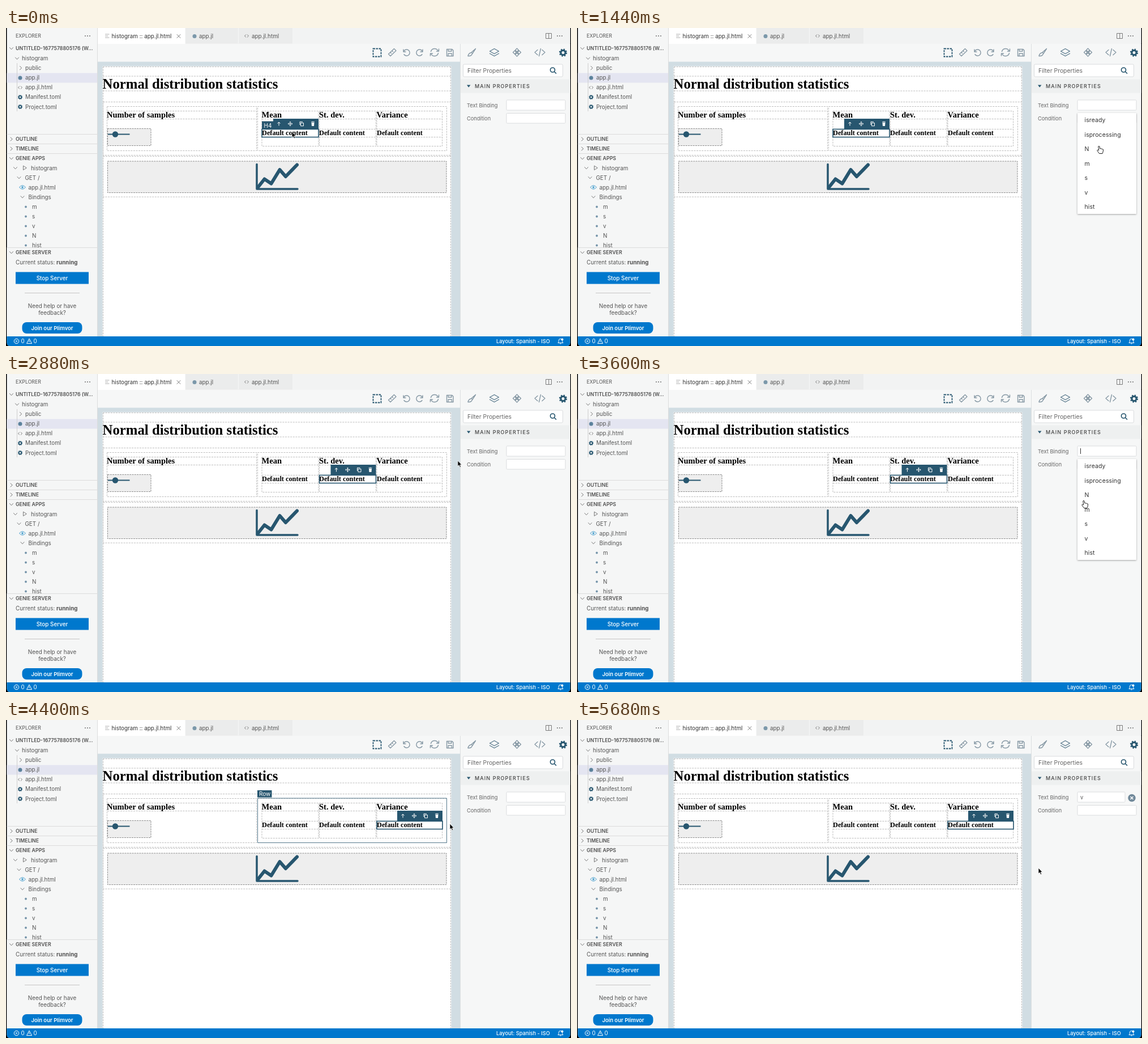
Write an HTML page that moves like this. It is 998 px wide and 561 px high and loops after 5760 ms.

```html
<!DOCTYPE html>
<html lang="en">
<head>
<meta charset="utf-8">
<title>Binding editor</title>
<style>
html, body { margin: 0; width: 100%; height: 100%; overflow: hidden; background: #000; }
svg { display: block; width: 998px; height: 561px; }
text { font: 9.9px Inter, sans-serif; fill: #555; white-space: pre; }
.head text, text.head { font-size: 8.8px; font-weight: 600; fill: #505050; }
.mid { text-anchor: middle; }
.page text { font: bold 14.55px "Liberation Serif", serif; fill: #000; }
.page .h1 { font-size: 24.8px; }
.page .h4 { font-size: 12.3px; }
.menu text { font-size: 10.5px; letter-spacing: .1px; fill: #333; }
.label text { font-size: 10px; fill: #fff; }
.label rect { fill: #27566f; }
.field { fill: #fff; stroke: #dadcde; }
.line { fill: none; stroke: #7a7a7a; stroke-linecap: round; stroke-linejoin: round; }
.tool { fill: none; stroke: #8799a5; stroke-width: 1.4; stroke-linecap: round; stroke-linejoin: round; }
.dash { fill: none; stroke: #bdbdbd; stroke-dasharray: 3 1.6; }
.block { fill: #eee; stroke: #8e8e8e; stroke-dasharray: 3 1.3; }
.pick { fill: none; stroke: #27566f; stroke-width: 1.6; }
.thin { fill: none; stroke: #55788c; }

.show { opacity: 0; animation: 5760ms step-end infinite; }
#sel1 { animation-name: sel1; }
#sel2 { animation-name: sel2; }
#sel3 { animation-name: sel3; }
#hov1 { animation-name: hov1; }
#hov2 { animation-name: hov2; }
#hov3 { animation-name: hov3; }
#hovRow { animation-name: hovRow; }
#narrow { animation-name: narrow; }
#clear { animation-name: clear; }
#load { animation-name: load; }
#valM { animation-name: valM; }
#valS { animation-name: valS; }
#valV { animation-name: valV; }
#caret { animation-name: caret; }
#menu, #hand { animation-name: menu; }
#arrow { animation-name: arrow; }
#cursor { animation: move 5760ms ease-in-out infinite; }
#arc { transform-origin: 980px 137px; animation: spin 960ms -880ms linear infinite; }

@keyframes sel1 { 0% { opacity: 1 } 41.67%, 100% { opacity: 0 } }
@keyframes sel2 { 0% { opacity: 0 } 41.67% { opacity: 1 } 72.22%, 100% { opacity: 0 } }
@keyframes sel3 { 0% { opacity: 0 } 72.22%, 100% { opacity: 1 } }
@keyframes hov1 { 0% { opacity: 1 } 1.39%, 100% { opacity: 0 } }
@keyframes hov2 { 0% { opacity: 0 } 37.5% { opacity: 1 } 45.83%, 100% { opacity: 0 } }
@keyframes hov3 { 0% { opacity: 0 } 70.83% { opacity: 1 } 75%, 100% { opacity: 0 } }
@keyframes hovRow { 0% { opacity: 0 } 75% { opacity: 1 } 77.78%, 100% { opacity: 0 } }
@keyframes narrow {
  0%, 19.44%, 41.67%, 56.94%, 72.22%, 87.5% { opacity: 0 }
  16.67%, 29.17%, 54.17%, 66.67%, 81.94%, 95.14%, 100% { opacity: 1 }
}
@keyframes clear { 0%, 41.67%, 72.22% { opacity: 0 } 29.17%, 66.67%, 95.14%, 100% { opacity: 1 } }
@keyframes load { 0%, 19.44%, 56.94%, 87.5%, 100% { opacity: 0 } 16.67%, 54.17%, 81.94% { opacity: 1 } }
@keyframes valM { 0%, 41.67%, 100% { opacity: 0 } 29.17% { opacity: 1 } }
@keyframes valS { 0%, 72.22%, 100% { opacity: 0 } 66.67% { opacity: 1 } }
@keyframes valV { 0% { opacity: 0 } 95.14%, 100% { opacity: 1 } }
@keyframes caret { 0%, 66.67%, 100% { opacity: 0 } 59.72% { opacity: 1 } }
@keyframes menu { 0%, 29.17%, 66.67%, 95.14%, 100% { opacity: 0 } 19.44%, 56.94%, 87.5% { opacity: 1 } }
@keyframes arrow { 0%, 29.17%, 66.67%, 95.14%, 100% { opacity: 1 } 19.44%, 56.94%, 87.5% { opacity: 0 } }
@keyframes spin { to { transform: rotate(360deg) } }
@keyframes move {
  0% { transform: translate(505px, 183px) }
  2.78%, 5.56% { transform: translate(556px, 168px) }
  15.28%, 19.44% { transform: translate(905px, 134px) }
  25% { transform: translate(922px, 208px) }
  27.78%, 29.17% { transform: translate(906px, 236px) }
  38.89% { transform: translate(651px, 181px) }
  41.67%, 44.44% { transform: translate(628px, 184px) }
  54.17%, 56.94% { transform: translate(900px, 134px) }
  62.5% { transform: translate(895px, 223px) }
  65.28%, 66.67% { transform: translate(898px, 261px) }
  72.22%, 73.61% { transform: translate(714px, 184px) }
  76.39% { transform: translate(784px, 183px) }
  80.56%, 81.94% { transform: translate(908px, 136px) }
  84.72% { transform: translate(909px, 242px) }
  90.28%, 94.44% { transform: translate(901px, 286px) }
  98.61%, 100% { transform: translate(815px, 261px) }
}
</style>
</head>
<body>
<svg viewBox="0 0 998 561">
  <defs>
    <path id="down" class="line" d="M-3 -1.5 0 1.8 3 -1.5"/>
    <path id="right" class="line" d="M-1.5 -3 1.8 0 -1.5 3"/>
    <path id="code" class="line" d="M-1.3 -2.2 -3.5 0 -1.3 2.2M1.3 -2.2 3.5 0 1.3 2.2"/>
    <g id="dots" fill="#666"><circle cx="-4" r=".9"/><circle r=".9"/><circle cx="4" r=".9"/></g>
    <g id="gear" fill="none" stroke="#27566f">
      <circle r="4" stroke-width="3"/><circle r="6" stroke-width="2.2" stroke-dasharray="2.356"/>
    </g>
    <g id="bar">
      <path fill="#27566f" d="M0 0H80V18H0z"/>
      <g fill="none" stroke="#fff">
        <path d="M10 12.5V6M7.4 8.5 10 6 12.6 8.5"/>
        <path d="M26.5 9H33.5M30 5.500V12.500M28.800 6.500 30 5.200 31.200 6.500M28.800 11.500 30 12.800 31.200 11.500M27.500 7.800 26.200 9 27.500 10.200M32.500 7.800 33.800 9 32.500 10.200"/>
        <path d="M48.500 7.500H53.500V12.800H48.500zM47 11V5.500H52"/>
      </g>
      <path fill="#fff" d="M67.500 7H72.500L72 13H68zM67 5.300H69L69.500 4.700H70.500L71 5.300H73V6.300H67z"/>
    </g>
    <g id="tag" class="label"><rect width="20" height="14"/><text x="3.500" y="11">H4</text></g>
    <filter id="shade" x="-10%" y="-10%" width="120%" height="120%">
      <feDropShadow dx="0" dy="1" stdDeviation="1.500" flood-opacity=".35"/>
    </filter>
    <clipPath id="frame"><path d="M1.500 0H996.500V555Q996.500 561 990 561H8Q1.500 561 1.500 555z"/></clipPath>
  </defs>

  <g clip-path="url(#frame)">
    <rect width="998" height="561" fill="#f5f6f6"/>

    <!-- sidebar -->
    <rect y="79.500" width="161" height="17" fill="#e4e5f1"/>
    <path stroke="#dcdcdc" d="M0 187.500H161M0 204.500H161M0 221.500H161M161.500 0V544"/>
    <path stroke="#cfcfcf" d="M19.500 62V147"/>
    <text x="17" y="17.200" style="font-size:8.8px">EXPLORER</text>
    <use href="#dots" x="144" y="14"/>
    <g class="head">
      <text x="17" y="39.200">UNTITLED-1677578805176 (W...</text>
      <text x="17" y="199">OUTLINE</text>
      <text x="17" y="216">TIMELINE</text>
      <text x="17" y="233">GENIE APPS</text>
    </g>
    <use href="#down" x="9.500" y="36"/>
    <use href="#down" x="19.500" y="53.500"/>
    <use href="#right" x="26" y="70.500"/>
    <use href="#right" x="9.500" y="196"/>
    <use href="#right" x="9.500" y="213"/>
    <use href="#down" x="9.500" y="230"/>
    <use href="#down" x="16.500" y="247"/>
    <use href="#down" x="23" y="264"/>
    <use href="#down" x="29" y="298"/>
    <text x="28" y="57">histogram</text>
    <text x="34" y="74">public</text>
    <text x="34" y="91">app.jl</text>
    <text x="34" y="108">app.jl.html</text>
    <text x="34" y="125">Manifest.toml</text>
    <text x="34" y="142.500">Project.toml</text>
    <circle cx="25" cy="88" r="3.500" fill="#5c829c"/>
    <use href="#code" x="25" y="105"/>
    <use href="#gear" transform="translate(25 122) scale(.58)"/>
    <use href="#gear" transform="translate(25 139) scale(.58)"/>
    <path class="line" d="M30.500 243.500V250.500L36 247z"/>
    <text x="44" y="250.500">histogram</text>
    <text x="33.500" y="267.500">GET /</text>
    <path fill="none" stroke="#4aa0cf" d="M23.500 281Q29 274.500 34.500 281Q29 287.500 23.500 281z"/>
    <circle cx="29" cy="281" r="1.800" fill="#4aa0cf"/>
    <text x="39.500" y="284.500">app.jl.html</text>
    <text x="39.500" y="301.500">Bindings</text>
    <path stroke="#7393a9" stroke-width="3.800" stroke-linecap="round" stroke-dasharray="0 17" d="M35 315.500V384"/>
    <text x="46" y="318.500">m</text>
    <text x="46" y="335.500">s</text>
    <text x="46" y="352.500">v</text>
    <text x="46" y="369.500">N</text>
    <text x="46" y="387">hist</text>
    <rect y="387.500" width="161" height="157" fill="#f5f6f6"/>
    <path stroke="#dcdcdc" d="M0 387.500H161"/>
    <use href="#down" x="9.500" y="396"/>
    <text class="head" x="17" y="399.200">GENIE SERVER</text>
    <text x="17" y="417">Current status: <tspan font-weight="700">running</tspan></text>
    <rect x="17" y="430.500" width="129" height="21" fill="#0078cd"/>
    <text class="mid" x="81.500" y="444.800" style="fill:#fff;font-weight:500">Stop Server</text>
    <path stroke="#c6c6c6" d="M33 467.500H130"/>
    <text class="mid" x="81.500" y="494">Need help or have</text>
    <text class="mid" x="81.500" y="506">feedback?</text>
    <rect x="28.500" y="519" width="106" height="20" rx="8" fill="#0078cd"/>
    <text class="mid" x="81.500" y="532.600" style="fill:#fff;font-weight:600;font-size:9.500px">Join our Plimvor</text>

    <!-- tabs -->
    <rect x="162" width="836" height="27.500" fill="#f2f3f3"/>
    <rect x="317" width="189" height="27.500" fill="#ebecec"/>
    <path stroke="#f6f6f6" d="M410.500 0V27"/>
    <rect x="162" width="154.500" height="28" fill="#fff"/>
    <path class="line" style="stroke:#aaa" d="M175.500 11H182M175.500 14H180M175.500 17H182"/>
    <text x="186.500" y="17.500" style="fill:#333">histogram :: app.jl.html</text>
    <path class="line" d="M302 11.500 308 17.500M308 11.500 302 17.500"/>
    <circle cx="333" cy="14.500" r="3.500" fill="#7b98aa"/>
    <text x="341" y="17.500" font-style="italic">app.jl</text>
    <use href="#code" x="425" y="14"/>
    <text x="434" y="17.500">app.jl.html</text>
    <path class="line" d="M954 9.500H963.500V18.500H954zM958.700 9.500V18.500"/>
    <use href="#dots" x="978" y="14"/>

    <!-- editor toolbar -->
    <rect x="162" y="28" width="836" height="32" fill="#f6f7f7"/>
    <rect x="648.500" y="36.500" width="14" height="14" fill="none" stroke="#27566f" stroke-width="1.800" stroke-dasharray="3.500 1.500"/>
    <g class="tool">
      <path d="M675.500 46 685.500 36.500 689 40 679 49.500zM679 43 680.500 44.500M682 40.200 683.500 41.700"/>
      <path d="M702 38V42H706M702.500 41.500A5.500 5.500 0 1 1 703 46.500"/>
      <path d="M736 38V42H732M735.500 41.500A5.500 5.500 0 1 0 735 46.500"/>
      <path d="M750.500 41.500A6.800 6.800 0 0 1 763 40M764.500 37V41H760.500M763.500 44.500A6.800 6.800 0 0 1 751 46M749.500 49V45H753.500"/>
      <path d="M778.500 37.500H788L790 39.500V49.500H778.500zM781 37.500V41H787V37.500M781 49.500V45H787.500V49.500"/>
      <path d="M829.500 36.500 822 43 824 45 829.500 36.500M821.500 43.500Q817 44.500 816 49.500Q822 50 823.500 45.500"/>
      <path style="stroke:#5d7c8f" d="M854.500 41 862.500 36.500 870.500 41 862.500 45.500zM854.500 45 862.500 49.500 870.500 45"/>
      <path d="M902.500 36 905.500 39 902.500 42 899.500 39zM902.500 44 905.500 47 902.500 50 899.500 47zM898.500 40 901.500 43 898.500 46 895.500 43zM906.500 40 909.500 43 906.500 46 903.500 43z"/>
      <path d="M939 38.500 934 43 939 47.500M947 38.500 952 43 947 47.500M944.500 36.500 941.500 49.500"/>
    </g>
    <use href="#gear" x="984" y="43.500"/>

    <!-- page -->
    <rect x="162" y="59.500" width="640" height="485" fill="#d1dde3"/>
    <rect x="170.500" y="67.500" width="616" height="477" fill="#fff"/>
    <g class="dash">
      <path d="M171 68.500H786M171.500 68V544M785.500 68V544M171 85H786M171 111H786"/>
      <rect x="171.500" y="130.500" width="614" height="94"/>
      <rect x="171.500" y="226.500" width="614" height="71.500"/>
      <rect x="178.500" y="138.500" width="264" height="78"/>
      <rect x="444.500" y="138.500" width="334" height="78"/>
      <path d="M179 146.500H443M179 160.500H443"/>
      <rect x="452" y="146.500" width="100" height="62"/>
      <rect x="553.500" y="146.500" width="100" height="62"/>
      <rect x="655" y="146.500" width="115.500" height="62"/>
      <path d="M452 160.500H770M452 178.500H770M452 192.500H770"/>
    </g>
    <rect class="block" x="179.500" y="177.500" width="76.500" height="30"/>
    <path stroke="#27566f" stroke-width="2" d="M180 187.500H218.500"/>
    <circle cx="193" cy="187.500" r="5.200" fill="#27566f"/>
    <rect class="block" x="179.500" y="235" width="598.500" height="55.500"/>
    <g fill="none" stroke="#27566f" stroke-linecap="round" stroke-linejoin="round">
      <path stroke-width="3.500" d="M443 240.500V284H515"/>
      <path stroke-width="6" d="M445 281 456.500 266.500 468.500 274.500 483.500 250 494 262 514 241.500"/>
    </g>
    <g class="page">
      <text class="h1" x="170.500" y="106.500">Normal distribution statistics</text>
      <text x="178" y="158">Number of samples</text>
      <text x="451.500" y="158">Mean</text>
      <text x="553" y="158">St. dev.</text>
      <text x="654.500" y="158">Variance</text>
      <text class="h4" x="452" y="189">Default content</text>
      <text class="h4" x="553" y="189">Default content</text>
      <text class="h4" x="655" y="189">Default content</text>
    </g>

    <!-- selection and hover -->
    <g id="sel1" class="show"><rect class="pick" x="452" y="178.500" width="100" height="14"/><use href="#bar" x="472" y="160"/></g>
    <g id="sel2" class="show"><rect class="pick" x="553.500" y="178.500" width="100" height="14"/><use href="#bar" x="573.500" y="160"/></g>
    <g id="sel3" class="show"><rect class="pick" x="655" y="178.500" width="116" height="14"/><use href="#bar" x="691" y="160"/></g>
    <g id="hov1" class="show"><use href="#tag" x="452" y="164.500"/></g>
    <g id="hov2" class="show"><rect class="thin" x="553.500" y="178.500" width="100" height="14"/><use href="#tag" x="553" y="164.500"/></g>
    <g id="hov3" class="show"><rect class="thin" x="655" y="178.500" width="116" height="14"/><use href="#tag" x="655" y="164.500"/></g>
    <g id="hovRow" class="show label">
      <path class="thin" d="M444.500 138H778.500V216.500H444.500z"/>
      <rect x="444" y="124" width="25.500" height="12.500"/>
      <text x="447" y="134">Row</text>
    </g>

    <!-- properties -->
    <rect x="802" y="59.500" width="196" height="485" fill="#f6f7f7"/>
    <path stroke="#dcdfe0" d="M802.500 28V544"/>
    <rect class="field" x="807.500" y="64" width="176" height="22" rx="2"/>
    <text x="815" y="78.500" style="font-size:10.400px;fill:#666">Filter Properties</text>
    <path fill="none" stroke="#27566f" stroke-width="1.700" d="M969.500 74A4 4 0 1 1 961.500 74A4 4 0 1 1 969.500 74M968.500 77 972 80.500"/>
    <rect x="803" y="90.500" width="195" height="24" fill="#eef0f0"/>
    <path fill="#27566f" d="M814 100.500H820.500L817.200 104.800z"/>
    <text x="828" y="105.500" style="font-size:9px;letter-spacing:1.100px;font-weight:500;fill:#444">MAIN PROPERTIES</text>
    <text x="814" y="139.500" style="font-size:9.300px;fill:#666">Text Binding</text>
    <text x="814" y="163" style="font-size:9.300px;fill:#666">Condition</text>
    <rect class="field" x="884" y="127" width="104" height="18" rx="1.500"/>
    <rect class="field" x="884" y="150.500" width="104" height="17.500" rx="1.500"/>
    <g id="narrow" class="show">
      <rect x="883" y="126" width="107" height="20" fill="#f6f7f7"/>
      <rect class="field" x="884" y="127" width="84" height="18" rx="1.500"/>
    </g>
    <g id="clear" class="show">
      <circle cx="980" cy="137.500" r="6.700" fill="#71899a"/>
      <path stroke="#fff" stroke-width="1.500" d="M977.500 135 982.500 140M982.500 135 977.500 140"/>
    </g>
    <g id="load" class="show"><path id="arc" fill="none" stroke="#27566f" stroke-width="1.700" d="M975 142A7 7 0 0 1 984 131.300"/></g>
    <g id="valM" class="show"><text x="889" y="139.500" style="font-size:9.300px">m</text><path stroke="#333" d="M897.500 131V141"/></g>
    <g id="valS" class="show"><text x="889" y="139.500" style="font-size:9.300px">s</text></g>
    <g id="valV" class="show"><text x="889" y="139.500" style="font-size:9.300px">v</text></g>
    <path id="caret" class="show" stroke="#333" d="M889.500 131V141"/>
    <g id="menu" class="show menu">
      <rect x="884" y="150" width="104" height="178" rx="1" fill="#fff" filter="url(#shade)"/>
      <text x="896.500" y="166">isready</text>
      <text x="896.500" y="191.500">isprocessing</text>
      <text x="896.500" y="217">N</text>
      <text x="896.500" y="242.500">m</text>
      <text x="896.500" y="268">s</text>
      <text x="896.500" y="293.500">v</text>
      <text x="896.500" y="319">hist</text>
    </g>

    <!-- status bar -->
    <rect y="544" width="998" height="17" fill="#0078cd"/>
    <g fill="none" stroke="#fff">
      <circle cx="18.500" cy="552.500" r="4.200"/>
      <path d="M16.800 550.800 20.200 554.200M20.200 550.800 16.800 554.200M41 548 45.500 556.500H36.500zM41 551V554"/>
      <path d="M975 555.500H984L982.700 553.500V551.500A3.200 3.200 0 0 0 976.300 551.500V553.500zM978.500 557H980.500"/>
    </g>
    <circle cx="982.500" cy="549.500" r="2" fill="#fff"/>
    <g style="--c:#fff">
      <text x="26.500" y="556" style="fill:#fff">0</text>
      <text x="48.500" y="556" style="fill:#fff">0</text>
      <text x="866" y="556" style="fill:#fff;font-size:9.200px;font-weight:500">Layout: Spanish - ISO</text>
    </g>
  </g>

  <g id="cursor">
    <path id="arrow" class="show" fill="#000" stroke="#fff" stroke-width=".8" d="M0 0V10L2.300 8 4 11.700 5.700 10.900 4.100 7.400H7.100z"/>
    <path id="hand" class="show" fill="#fff" stroke="#222" stroke-linejoin="round" d="M-1.200 1Q0 -.5 1 1L1.800 5Q3 4 4 5.200Q5.500 4.600 6 5.800Q7.500 5.500 7.600 7L7 11 6 13.500H.5L-3 8.500Q-3.500 6.500 -1.500 7.200L-.3 8z"/>
  </g>
</svg>
</body>
</html>
```
